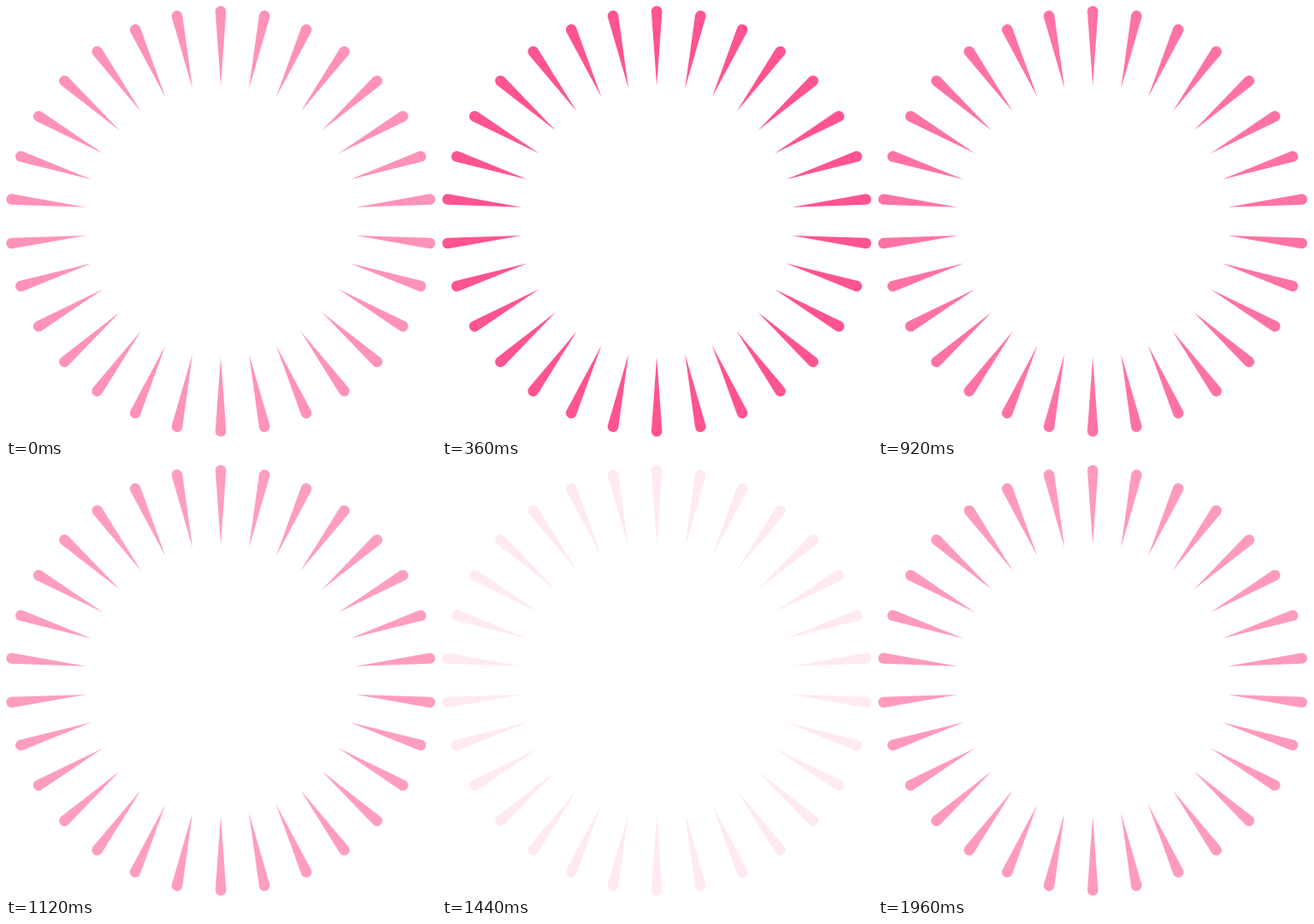
Recreate the animation shown at these times as an HTML page. Size 503 px wide and 505 px high, loop 2000 ms.

```html
<!DOCTYPE html>
<html lang="en">
<head>
<meta charset="utf-8">
<title>Pulsing rays</title>
<style>
  html, body { margin: 0; width: 100%; height: 100%; overflow: hidden; background: #fff; }
  svg { display: block; width: 503px; height: 505px; }
</style>
</head>
<body>
<svg viewBox="0 0 503 505"><path id="rays" fill="#ff2f7b" transform="translate(251.2 252.3)"/></svg>
<script>
const LOOP = 2000, STEP = 40, COUNT = 30;
const INNER = 159, OUTER = 246, CAP = 6.3;
const PEAK = 580, EMPTY = 1500; // ms of full and zero opacity
const rays = document.getElementById('rays');

// Rises from EMPTY to the next PEAK, then falls back, slightly faster near zero
function opacityAt(t) {
  const sincePeak = (t - PEAK + LOOP) % LOOP;
  const fall = EMPTY - PEAK, rise = LOOP - fall;
  const level = sincePeak < fall ? 1 - sincePeak / fall : (sincePeak - fall) / rise;
  return level ** .85;
}

// A drop with its point towards the centre and a round outer end
function ray(angle) {
  const sin = Math.sin(angle), cos = Math.cos(angle);
  const at = (side, r) => `${(r * sin + side * cos).toFixed(2)} ${(side * sin - r * cos).toFixed(2)}`;
  return `M${at(0, INNER)}L${at(-CAP, OUTER)}A${CAP} ${CAP} 0 0 1 ${at(CAP, OUTER)}Z`;
}

rays.setAttribute('d', Array.from({ length: COUNT }, (_, i) => ray(i * 2 * Math.PI / COUNT)).join(''));

function draw() {
  const t = Math.floor(performance.now() % LOOP / STEP) * STEP;
  rays.setAttribute('opacity', opacityAt(t));
  requestAnimationFrame(draw);
}
draw();
</script>
</body>
</html>
```
